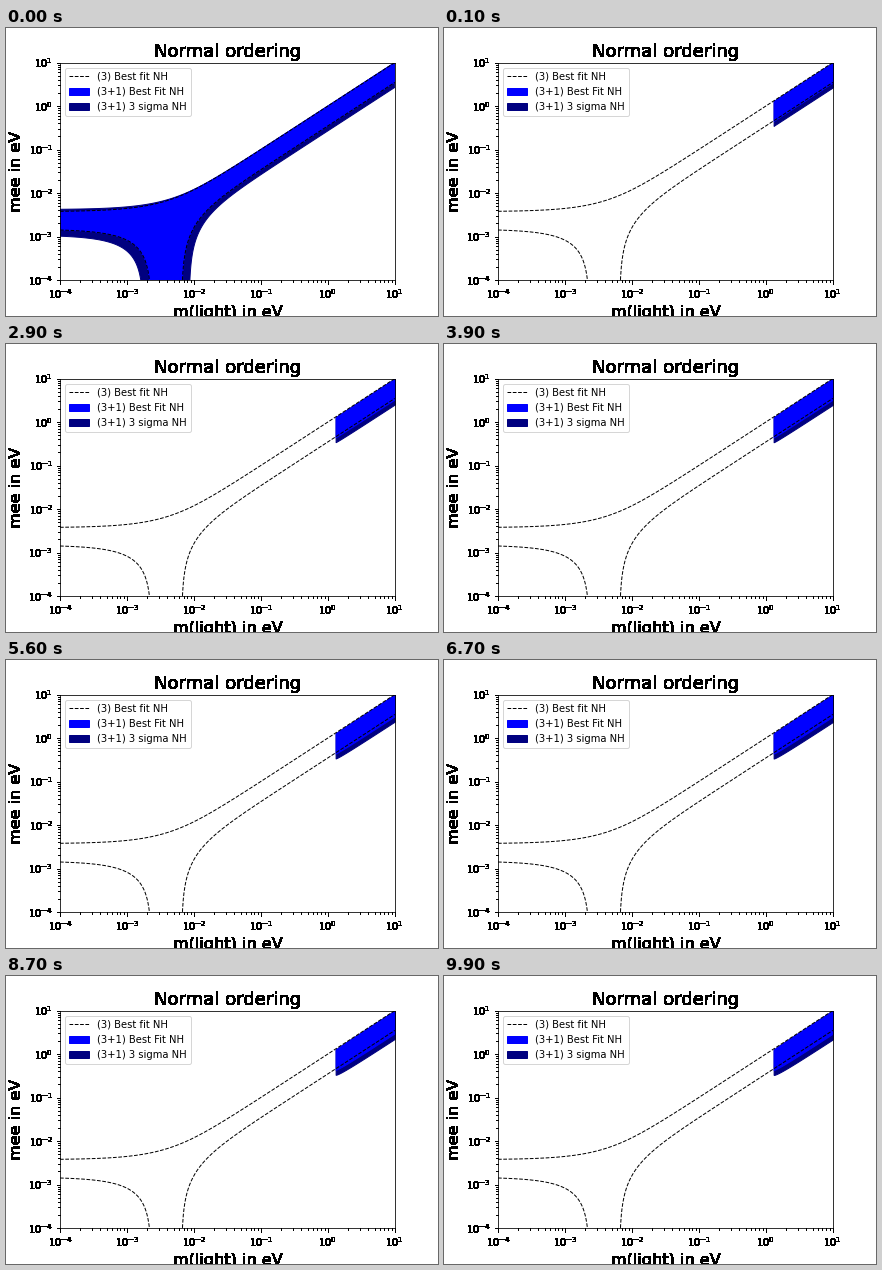
These frames come from a looping animation (432x288 px, 10 s). A matplotlib script:

```python
import numpy as np
import matplotlib.pyplot as plt
from matplotlib.animation import FuncAnimation
from matplotlib.patches import Patch

FRAMES, INTERVAL = 100, 100
DM21, DM31, DM41 = 7.39e-5, 2.525e-3, 1.7
S12, S13 = 0.310, 0.0224            # best fit sin^2 of the mixing angles
S12_LO, S12_HI, S13_HI = 0.275, 0.350, 0.0244   # 3 sigma limits
S14_STEP = 0.000415                 # growth of sin^2(theta14) per frame
FLOOR = 1e-6

m1 = np.logspace(-4, 1, 1500)
m2 = np.sqrt(m1**2 + DM21)
m3 = np.sqrt(m1**2 + DM31)


def terms(s12, s13):
    return (1 - s12) * (1 - s13) * m1, s12 * (1 - s13) * m2, s13 * m3


a, b, c = terms(S12, S13)
best = (a + b + c, np.maximum(b - a - c, a - b - c))

a, b, c = terms(S12_HI, S13_HI)
b_lo = terms(S12_LO, S13_HI)[1]
sigma = (a + b + c, np.maximum(b_lo - a - c, a - b - c))


def with_sterile(band, s14):
    """Upper and lower limit once the fourth state is mixed in."""
    if s14 == 0:
        return m1, band[0], np.maximum(band[1], FLOOR)
    ok = m1**2 >= DM41
    m4 = np.sqrt(m1[ok]**2 - DM41)
    top = (1 - s14) * band[0][ok] + s14 * m4
    low = (1 - s14) * band[1][ok] - s14 * m4
    return m1[ok], top, np.maximum(low, FLOOR)


def solid(img, dpi):
    """Turn every touched pixel fully black, without soft edges."""
    img[..., :3] = 0
    img[..., 3] = img[..., 3] > 0
    return img, 0, 0


fig, ax = plt.subplots(figsize=(6, 4), dpi=72)
fig.subplots_adjust(left=0.125, right=0.9, bottom=0.125, top=0.88)
ax.set(xscale="log", yscale="log", xlim=(1e-4, 10), ylim=(1e-4, 10))
ax.set_title("Normal ordering", fontsize=18)
ax.set_xlabel("m(light) in eV", fontsize=16)
ax.set_ylabel("mee in eV", fontsize=16)
for part in (ax.title, ax.xaxis, ax.yaxis):
    part.set_agg_filter(solid)

for limit in best:
    line, = ax.plot(m1, np.maximum(limit, FLOOR), "k--", lw=1)
ax.legend(
    [line, Patch(color="blue"), Patch(color="navy")],
    ["(3) Best fit NH", "(3+1) Best Fit NH", "(3+1) 3 sigma NH"],
    loc="upper left", fontsize=10)

fills = []


def update(i):
    while fills:
        fills.pop().remove()
    for band, color in ((sigma, "navy"), (best, "blue")):
        x, top, low = with_sterile(band, i * S14_STEP)
        fills.append(ax.fill_between(x, low, top, color=color))
    ax.set(xlim=(1e-4, 10), ylim=(1e-4, 10))
    return fills


anim = FuncAnimation(fig, update, frames=FRAMES, interval=INTERVAL,
                     init_func=lambda: update(0), repeat=True,
                     repeat_delay=0, blit=False)
plt.show()
```
